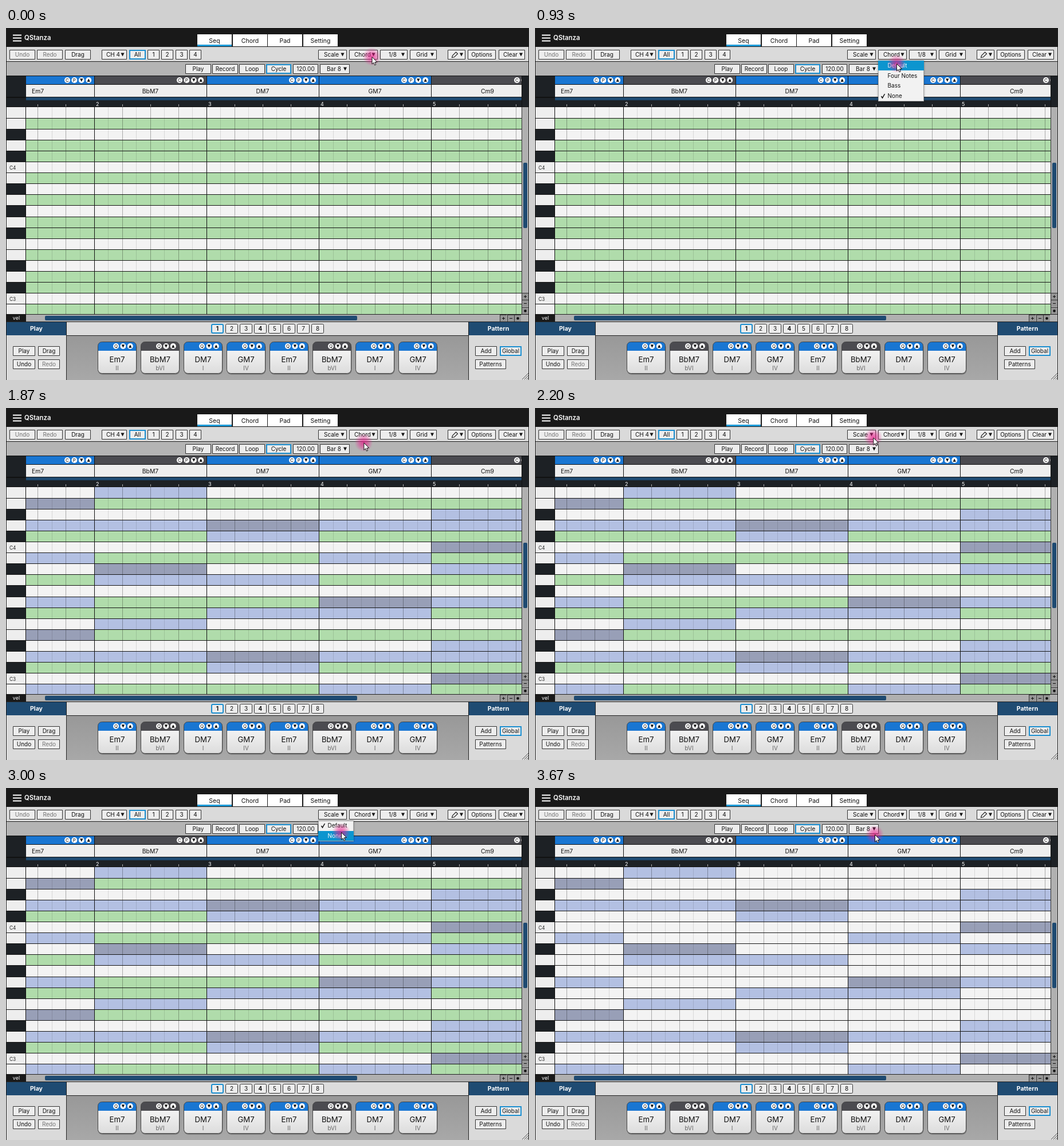
These frames come from a looping animation (913x614 px, 3740 ms). An HTML page with a canvas:

```html
<!DOCTYPE html>
<html lang="en">
<head>
<meta charset="utf-8">
<title>Chord sequencer</title>
<style>
html, body { margin: 0; width: 100%; height: 100%; overflow: hidden; background: #000; }
canvas { display: block; }
</style>
</head>
<body>
<canvas id="stage" width="913" height="614"></canvas>
<script>
const c = document.getElementById('stage').getContext('2d');
const LOOP = 3740;
const BLUE = '#1976d2', NAVY = '#1f4b72', DARK = '#1d2125', GRAY = '#4b4b50', ACCENT = '#1c8fd0';
const LEFT = 35, RIGHT = 900, TOP = 138, BOTTOM = 499, BAR = 196.3, ROW = 19.1;
const MENU_TOP = 57, ITEM = 17.5;

// Pitch classes, root first
const CHORDS = [
  { name: 'Em7', degree: 'II', notes: [4, 7, 11, 2] },
  { name: 'BbM7', degree: 'bVI', notes: [10, 2, 5, 9], outside: true },
  { name: 'DM7', degree: 'I', notes: [2, 6, 9, 1] },
  { name: 'GM7', degree: 'IV', notes: [7, 11, 2, 6] },
  { name: 'Cm9', notes: [0, 3, 7, 10, 2], outside: true }
];
const SCALE = [2, 4, 6, 7, 9, 11, 1];
const BLACK_KEYS = [1, 3, 6, 8, 10];

// Cursor moves: first step, number of steps, end point
const START = [638.5, 50];
const MOVES = [[10, 5, 631, 62], [27, 8, 588.5, 51], [40, 6, 585, 77], [53, 3, 593, 81]];

const barX = bars => Math.floor(-42.3 + bars * BAR);
const rowY = row => Math.floor(TOP + row * ROW);

function rect(x, y, w, h, color) {
  c.fillStyle = color;
  c.fillRect(x, y, w, h);
}

function text(s, x, y, size = 10, color = '#111', align = 'center', weight = 400) {
  c.font = `${weight} ${size}px Inter, "Liberation Sans", sans-serif`;
  c.textAlign = align;
  c.fillStyle = color;
  c.fillText(s, x, y);
}

function path(points, close) {
  c.beginPath();
  points.forEach(([x, y]) => c.lineTo(x, y));
  if (close) c.closePath();
}

function line(points, color, width, close) {
  path(points, close);
  c.strokeStyle = color;
  c.lineWidth = width;
  c.stroke();
}

function triangle(x, y, dir = 1, r = 3) {
  path([[x - r, y - r * dir], [x + r, y - r * dir], [x, y + r * dir]]);
  c.fillStyle = '#111';
  c.fill();
}

function roundBox(x, y, w, h, r, fill, stroke, width = 1) {
  c.beginPath();
  c.roundRect(x, y, w, h, r);
  c.fillStyle = fill;
  c.fill();
  if (stroke) {
    c.strokeStyle = stroke;
    c.lineWidth = width;
    c.stroke();
  }
}

function button(label, x, y, w, { on, off, r = 0, bold } = {}) {
  const border = on ? 2 : 1;
  roundBox(x + border / 2, y + border / 2, w - border, 17 - border, r, '#ededed', on ? ACCENT : '#333', border);
  text(label, x + w / 2, y + 12, 10, off ? '#777' : '#111', 'center', bold ? 700 : 400);
}

function dropdown(label, x, y, w, textX, arrowX) {
  button('', x, y, w);
  text(label, textX, y + 12, 10, '#111', 'left');
  triangle(arrowX, y + 8.5);
}

function badge(x, y, mark) {
  c.beginPath();
  c.arc(x, y, 5, 0, 7);
  c.fillStyle = '#fff';
  c.fill();
  if (mark === 'up' || mark === 'down') triangle(x, y, mark === 'up' ? -1 : 1, 2.7);
  else text(mark, x, y + 3, 8);
}

function toolbars() {
  rect(0, 0, 913, 33, '#191919');
  [12, 17, 22].forEach(y => rect(12, y - .5, 15, 2, '#fff'));
  text('QStanza', 32, 21, 11.3, '#fff', 'left', 600);
  ['Seq', 'Chord', 'Pad', 'Setting'].forEach((s, i) => {
    const x = Math.round(334 + i * 61.6);
    rect(x, 11, 60, 21, '#fff');
    text(s, x + 30, 26, 10.5);
  });
  rect(334, 29, 60, 3, '#1e9bd8');

  rect(0, 33, 913, 25, '#dadada');
  rect(0, 58, 913, 1, '#222');
  rect(0, 59, 913, 24, '#b4b4b4');
  button('Undo', 6, 38, 45, { off: true });
  button('Redo', 54, 38, 45, { off: true });
  button('Drag', 103, 38, 45);
  dropdown('CH 4', 167, 38, 44, 175, 203.5);
  button('All', 215, 38, 29, { on: true });
  for (let i = 0; i < 4; i++) button(i + 1, Math.round(247 + i * 24.4), 38, 21);
  dropdown('Scale', 545, 38, 50, 555, 587.5);
  dropdown('Chord', 599, 38, 50, 608, 641.5);
  dropdown('1/8', 653, 38, 48, 668, 693);
  dropdown('Grid', 705, 38, 47, 716, 744);
  dropdown('', 771, 38, 31, 0, 795);
  line([[778.5, 51.5], [779.5, 48], [785.5, 42], [788.5, 45], [782.5, 50.7]], '#222', 1.1, true);
  button('Options', 806, 38, 49);
  dropdown('Clear', 860, 38, 46, 868, 899);

  button('Play', 313, 63, 45);
  button('Record', 360, 63, 45);
  button('Loop', 407, 63, 45);
  button('Cycle', 454, 63, 44, { on: true });
  button('120.00', 501, 63, 44);
  dropdown('Bar 8', 548, 63, 52, 560, 592);
}

function headers() {
  rect(0, 83, 913, 55, '#111');
  rect(1, 84, 34, 36, DARK);
  rect(1, 122, 34, 15, DARK);
  rect(901, 84, 11, 53, DARK);
  c.save();
  c.beginPath();
  c.rect(LEFT, 84, RIGHT - LEFT, 54);
  c.clip();
  rect(LEFT, 121, 865, 5, NAVY);
  rect(LEFT, 126, 865, 11, DARK);
  CHORDS.forEach((chord, i) => {
    const x = barX(i), end = barX(i + 1);
    rect(x + 1, 84, end - x - 1, 14, chord.outside ? GRAY : BLUE);
    rect(x + 1, 99, end - x - 1, 21, '#eeeeee');
    ['C', 'P', 'down', 'up'].forEach((m, j) => badge(end - 47 + j * 12.4, 91, m));
    text(chord.name, (x + end) / 2, 113.5, 10.4);
    for (let j = 1; j < 4; j++) rect(barX(i + j / 4), 133, 1, 4, '#aaa');
    if (i) text(i + 1, x + 3, 135.5, 9, '#fff', 'left');
  });
  c.restore();
}

function noteColor(pitch, chord, showScale, showChords) {
  const n = showChords ? chord.notes.indexOf(pitch) : -1;
  if (n === 0) return '#989fb7';
  if (n > 0) return '#b3c0e2';
  return showScale && SCALE.includes(pitch) ? '#b0dcab' : '#f3f3f3';
}

function grid(showScale, showChords) {
  c.save();
  c.beginPath();
  c.rect(0, TOP, RIGHT, BOTTOM - TOP);
  c.clip();
  for (let r = 0; r < 19; r++) {
    const y = rowY(r), pitch = (29 - r) % 12;
    rect(0, y, LEFT, 20, BLACK_KEYS.includes(pitch) ? DARK : '#eeeeee');
    if (pitch === 0) text(r < 10 ? 'C4' : 'C3', 6, y + 14, 8.3, '#222', 'left');
    CHORDS.forEach((chord, i) => {
      const x = Math.max(LEFT, barX(i));
      rect(x, y, 197, 20, noteColor(pitch, chord, showScale, showChords));
    });
  }
  for (let i = 4; i < 40; i++) {
    const color = i % 8 === 0 ? '#111' : i % 2 ? 'rgba(0,0,0,.11)' : 'rgba(0,0,0,.3)';
    rect(barX(i / 8), TOP, 1, BOTTOM - TOP, color);
  }
  for (let r = 1; r < 19; r++) rect(0, rowY(r), RIGHT, 1, '#161616');
  rect(34, TOP, 1, BOTTOM - TOP, '#111');
  c.restore();
}

function smallButton(x, y, kind) {
  rect(x, y, 12, 12, '#333');
  rect(x + 1, y + 1, 11, 11, '#959595');
  if (kind === 2) {
    c.beginPath();
    c.arc(x + 6.5, y + 6.5, 2.3, 0, 7);
    c.fillStyle = '#111';
    c.fill();
    return;
  }
  rect(x + 4, y + 6, 5, 1, '#111');
  if (kind === 0) rect(x + 6, y + 4, 1, 5, '#111');
}

function scrollbars() {
  rect(900, TOP, 13, 375, '#b0b0b0');
  rect(900, TOP, 1, 361, '#333');
  rect(LEFT, BOTTOM, 878, 13, '#b0b0b0');
  rect(0, BOTTOM, 913, 1, '#222');
  rect(0, BOTTOM, LEFT, 13, '#191919');
  text('vel', 18, 509, 9, '#fff');
  roundBox(68, 502, 545, 8, 2, NAVY);
  roundBox(903, 235, 7, 114, 2, NAVY);
  for (let i = 0; i < 3; i++) {
    smallButton(Math.round(862 + i * 12.5), 500, i);
    smallButton(900, Math.round(462 + i * 12.4), i);
  }
}

function card(i) {
  const x = 160 + i * 75, chord = CHORDS[i % 4];
  roundBox(x + .5, 548.5, 68, 56, 8, 'rgba(0,0,0,.3)');
  const body = c.createLinearGradient(0, 563, 0, 603);
  body.addColorStop(0, '#f2f2f2');
  body.addColorStop(1, '#dcdcdc');
  c.save();
  c.beginPath();
  c.roundRect(x + .5, 547.5, 67, 55, 7);
  c.clip();
  rect(x, 547, 69, 57, body);
  rect(x, 547, 69, 16, chord.outside ? GRAY : BLUE);
  c.restore();
  c.beginPath();
  c.roundRect(x + .5, 547.5, 67, 55, 7);
  c.strokeStyle = '#444';
  c.lineWidth = 1;
  c.stroke();
  ['Q', 'down', 'up'].forEach((m, j) => badge(x + 32 + j * 12.4, 555, m));
  text(chord.name, x + 34, 582.5, 13.2);
  text(chord.degree, x + 34, 597, 10, '#666');
}

function bottomPanels() {
  rect(0, 512, 913, 102, '#222');
  rect(106, 513, 701, 23, '#dcdcdc');
  const back = c.createLinearGradient(0, 536, 0, 614);
  back.addColorStop(0, '#989898');
  back.addColorStop(1, '#a8a8a8');
  rect(106, 537, 701, 77, back);
  for (let i = 0; i < 8; i++) {
    button(i + 1, 358 + i * 25, 516, 22, { on: i === 0, bold: i === 0 || i === 3, r: 2 });
    card(i);
  }

  [[0, 'Play'], [808, 'Pattern']].forEach(([x, title]) => {
    rect(x, 513, 105, 23, NAVY);
    rect(x, 536, 105, 78, '#dadada');
    text(title, x + (x ? 51.5 : 53), 528, 10.5, '#fff', 'center', 700);
  });
  button('Play', 12, 555, 39);
  button('Drag', 56, 555, 38);
  button('Undo', 12, 578, 39);
  button('Redo', 56, 578, 38, { off: true });
  button('Add', 819, 555, 38);
  button('Global', 862, 555, 38, { on: true });
  button('Patterns', 819, 578, 54);
  [3, 7, 11].forEach(d => line([[912 - d, 613], [912, 613 - d]], '#555', 1));
}

function menu(x, w, items, checked, cursorY) {
  const hover = Math.floor((cursorY - MENU_TOP) / ITEM);
  c.save();
  c.shadowColor = 'rgba(0,0,0,.4)';
  c.shadowBlur = 3;
  rect(x, MENU_TOP, w, items.length * ITEM + 1, '#f2f2f2');
  c.restore();
  c.strokeStyle = '#aaa';
  c.lineWidth = 1;
  c.strokeRect(x + .5, MENU_TOP + .5, w - 1, items.length * ITEM);
  items.forEach((s, i) => {
    const y = Math.round(MENU_TOP + i * ITEM), color = i === hover ? '#fff' : '#111';
    if (i === hover) rect(x, y, w, 17, '#0c95cf');
    text(s, x + 16.5, y + 12.3, 10, color, 'left');
    if (i === checked) line([[x + 5.5, y + 9], [x + 7.5, y + 12], [x + 11.5, y + 5]], color, 1.5);
  });
}

function cursorAt(step) {
  let [x, y] = START;
  for (const [first, count, tx, ty] of MOVES) {
    const u = Math.min(1, Math.max(0, (step - first + 1) / count));
    const e = u * u * (3 - 2 * u);
    x += (tx - x) * e;
    y += (ty - y) * e;
  }
  return [x, y];
}

function cursor(x, y) {
  const glow = c.createRadialGradient(x, y, 0, x, y, 16);
  glow.addColorStop(0, 'rgba(233,22,135,.72)');
  glow.addColorStop(.45, 'rgba(233,30,140,.48)');
  glow.addColorStop(1, 'rgba(233,40,145,0)');
  rect(x - 16, y - 16, 32, 32, glow);
  c.save();
  c.translate(x, y);
  c.lineJoin = 'round';
  path([[.5, .5], [.5, 13], [3.3, 10.4], [5.1, 14.8], [7.2, 13.9], [5.4, 9.7], [9.3, 9.4]], true);
  c.fillStyle = '#fff';
  c.fill();
  c.strokeStyle = '#111';
  c.lineWidth = 1;
  c.stroke();
  c.restore();
}

function draw() {
  // The pointer advances 15 steps per second
  const step = Math.floor((performance.now() % LOOP + 4) * .015);
  const [x, y] = cursorAt(step);
  toolbars();
  headers();
  grid(step < 48, step >= 19);
  scrollbars();
  bottomPanels();
  rect(0, 0, 1, 614, '#222');
  rect(912, 0, 1, 614, '#222');
  if (step >= 8 && step < 19) menu(599, 80, ['Default', 'Four Notes', 'Bass', 'None'], 3, y);
  if (step >= 35 && step < 48) menu(545, 62, ['Default', 'None'], 0, y);
  cursor(x, y);
  requestAnimationFrame(draw);
}
draw();
</script>
</body>
</html>
```
